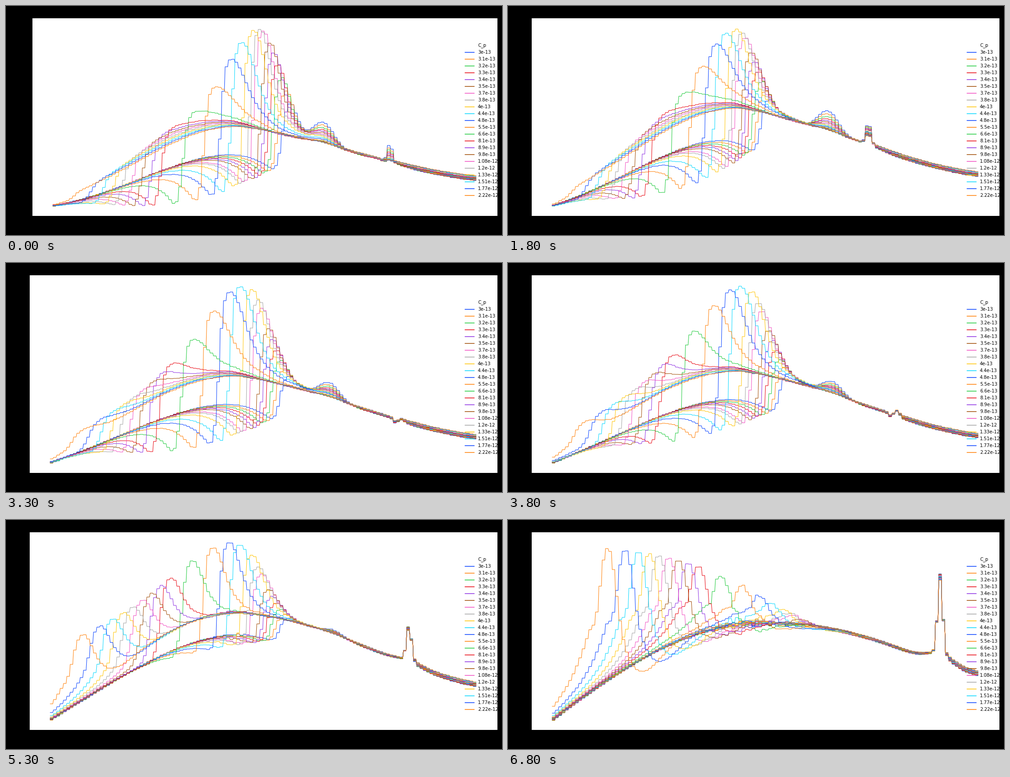
A matplotlib script that plays this animation: 1088 px wide and 504 px high, repeating every 7.1 s.

```python
import numpy as np
import matplotlib.pyplot as plt
from matplotlib.animation import FuncAnimation
from matplotlib.patches import Rectangle

W, H, DPI = 1088, 504, 64
PX = 72 / DPI                      # one pixel in points
X0, X1 = 97, 1031
STEPS, PITCH, FLAT = 128, 7.31, 5.6
TOP = 46
LAST = 14

CAPS = ["3e-13", "3.1e-13", "3.2e-13", "3.3e-13", "3.4e-13", "3.5e-13",
        "3.7e-13", "3.8e-13", "4e-13", "4.4e-13", "4.8e-13", "5.5e-13",
        "6.6e-13", "8.1e-13", "8.9e-13", "9.8e-13", "1.08e-12", "1.2e-12",
        "1.33e-12", "1.51e-12", "1.77e-12", "2.22e-12"]
COLORS = ["#023eff", "#ff7c00", "#1ac938", "#e8000b", "#8b2be2",
          "#9f4800", "#f14cc1", "#a3a3a3", "#ffc400", "#00d7ff"]
SERIES = np.arange(len(CAPS))

# Resonance frequency goes with 1/sqrt(C); tune runs from 0 (low) to 1 (high).
freq = 1 / np.sqrt([float(c) for c in CAPS])
TUNE = (freq - freq.min()) / (freq.max() - freq.min())

# Key points of the sweep; everything else follows from the stage number.
STAGES = [0, 2, 5, 7, 9, 11, 14]
CREST = [266, 231, 223, 250, 229, 207, 228]
END = [377, 367, 369, 381, 376, 361, 338]
SCALE = [1.01, 0.94, 0.91, 1.01, 0.99, 1.01, 1.04]
SPIKE_X = [841, 828, 772, 868, 838, 884, 948]
SPIKE_H = [38, 140, 3, 4, 20, 80, 178]

left_edges = X0 + PITCH * np.arange(STEPS)
grid = left_edges + FLAT / 2
rng = np.random.default_rng(4)
noise = rng.normal(size=(len(CAPS), STEPS))


def gauss(x, centre, width):
    return np.exp(-((x - centre) / width) ** 2)


def swell(u):
    return (1 - np.cos(np.pi * np.clip(u, 0, 1))) / 2


def slope_up(crest_x, bend):
    """1 at the left end, 0 from crest_x on."""
    u = np.clip((crest_x - grid) / (crest_x - X0), 0, 1)
    return (1 - bend) * swell(u) + bend * u ** 2


def slope_down(crest_x, power):
    """0 up to crest_x, 1 at the right end."""
    v = np.clip((grid - crest_x) / (X1 - crest_x), 0, 1)
    return ((v + swell(v)) / 2) ** power


def curves(stage):
    crest, end, scale, spike_x, spike_h = (
        np.interp(stage, STAGES, key)
        for key in (CREST, END, SCALE, SPIKE_X, SPIKE_H))
    p = stage / LAST
    late = min(1, 2 * (1 - p))           # fades out over the second half

    # envelopes after and before the resonance
    bend = 0.3 + 0.5 * p
    crest_x = 505 + 45 * p ** 6
    upper = (crest + (425 - crest) * slope_up(crest_x, bend)
             + (end - crest) * slope_down(crest_x, 1 + 0.8 * p ** 5))
    floor = crest + 50 * min(1, (LAST - stage) / 4)
    lower = floor + (439 - floor) * slope_up(540, bend)
    lower = np.where(grid > 540, np.maximum(lower, upper), lower)

    # resonance of every series
    peak_x = (X0 + scale * (65 + 453 * TUNE + 80 * TUNE * (1 - TUNE))
              + 52 * np.clip((stage - 11) / 3, 0, 1))
    centre = 0.83 - 0.009 * stage
    spread = np.where(TUNE < centre, 0.23 + 0.19 * p ** 2, 0.165)
    slow = 360 * p ** 4 * (1 - TUNE) ** 1.4
    height = 200 * late ** 0.4 * gauss(TUNE, centre, spread) + slow
    width = np.minimum(20 + 85 * (1 - TUNE), 90 * np.exp(-stage / 11.6))
    depth = (100 * late * np.sin(0.82 * np.pi * TUNE) ** 1.3 - 0.38 * slow)

    # after the resonance the series fan out
    fan = (0.15 * (1 - p ** 2) * np.clip(575 - grid, -20, 220)
           * np.minimum((21 - SERIES[:, None]) / 8, 1.3))
    high = upper - fan
    room = [np.interp(x, grid, row) - TOP for x, row in zip(peak_x, high)]
    height = height / np.max(height / room)

    rows = []
    for i in SERIES:
        px, jump = peak_x[i], peak_x[i] - 20
        after = high[i] - height[i] / (1 + np.abs((grid - px) / width[i]) ** 2.5)
        after += 0.15 * slow[i] * gauss(grid, px + 75, 60)

        reach = np.interp(px, [200, 350, 480], [45, 38, 52])
        before = lower + depth[i] * np.exp(-np.maximum(jump - grid - 18, 0) / reach)

        soft = np.interp(px, [160, 430], [8, 5])
        mix = 1 / (1 + np.exp(-np.clip((grid - jump) / soft, -40, 40)))
        y = before + (after - before) * mix

        # side bump, narrow spike with its shoulder, and the notch before it
        bump = 48 * np.clip((13 - stage) / 8, 0, 1) * np.exp(-i / 6)
        y -= bump * gauss(grid, 695 + 2 * stage, 31)
        spike = spike_h * np.exp(-i / (6 + stage ** 2))
        y -= spike * (gauss(grid, spike_x, 8) + 0.12 * gauss(grid, spike_x, 40))
        y += 10 * np.exp(-spike_h / 30) * gauss(grid, spike_x - 13, 6)

        rank = (i - 10.5) / 10.5
        tail = np.clip((grid - spike_x) / 20, 0, 1)
        start = np.clip((300 - grid) / 200, 0, 1)
        y -= rank * (0.8 + 2 * p ** 4 + 2.4 * tail + 1.2 * start)
        y += noise[i] * (0.4 + 3 * p ** 6 * gauss(grid, 520, 80))
        rows.append(y)
    return np.array(rows)


def stairs_x(start):
    x = np.column_stack([left_edges, left_edges + FLAT]).ravel()
    return start + (x - X0) * (X1 - start) / (X1 - X0)


fig = plt.figure(figsize=(W / DPI, H / DPI), dpi=DPI, facecolor="black")
ax = fig.add_axes([0, 0, 1, 1])
ax.set_xlim(0, W)
ax.set_ylim(H, 0)
ax.axis("off")

panel = Rectangle((51.5, 27), 1026.5, 435, color="white", lw=0, zorder=0)
ax.add_patch(panel)
lines = [ax.plot([], [], color=COLORS[i % 10], lw=PX, zorder=2)[0]
         for i in SERIES]

font = dict(family="DejaVu Sans", fontsize=10 * PX, color="black",
            va="baseline", zorder=4)
ax.text(1035, 89.4, "C_p", **font)
for i, cap in enumerate(CAPS):
    y = 102 + 15 * i
    ax.plot([1007, 1027], [y, y], color=COLORS[i % 10], lw=1.5 * PX, zorder=3)
    ax.text(1035, y + 3.4, cap, **font)

stages = [curves(s) for s in range(LAST + 1)]


def update(frame):
    stage = 0 if frame < 3 else 1 + (frame - 3) // 5
    edge = 57.5 if stage == 0 else 51.5
    panel.set_bounds(edge, 27, 1078 - edge, 435)
    x = stairs_x(edge + 45.5)
    for line, y in zip(lines, stages[stage]):
        line.set_data(x, np.repeat(y, 2))
    return [panel, *lines]


anim = FuncAnimation(fig, update, frames=71, interval=100, repeat=True,
                     repeat_delay=0, blit=False)
plt.show()
```
